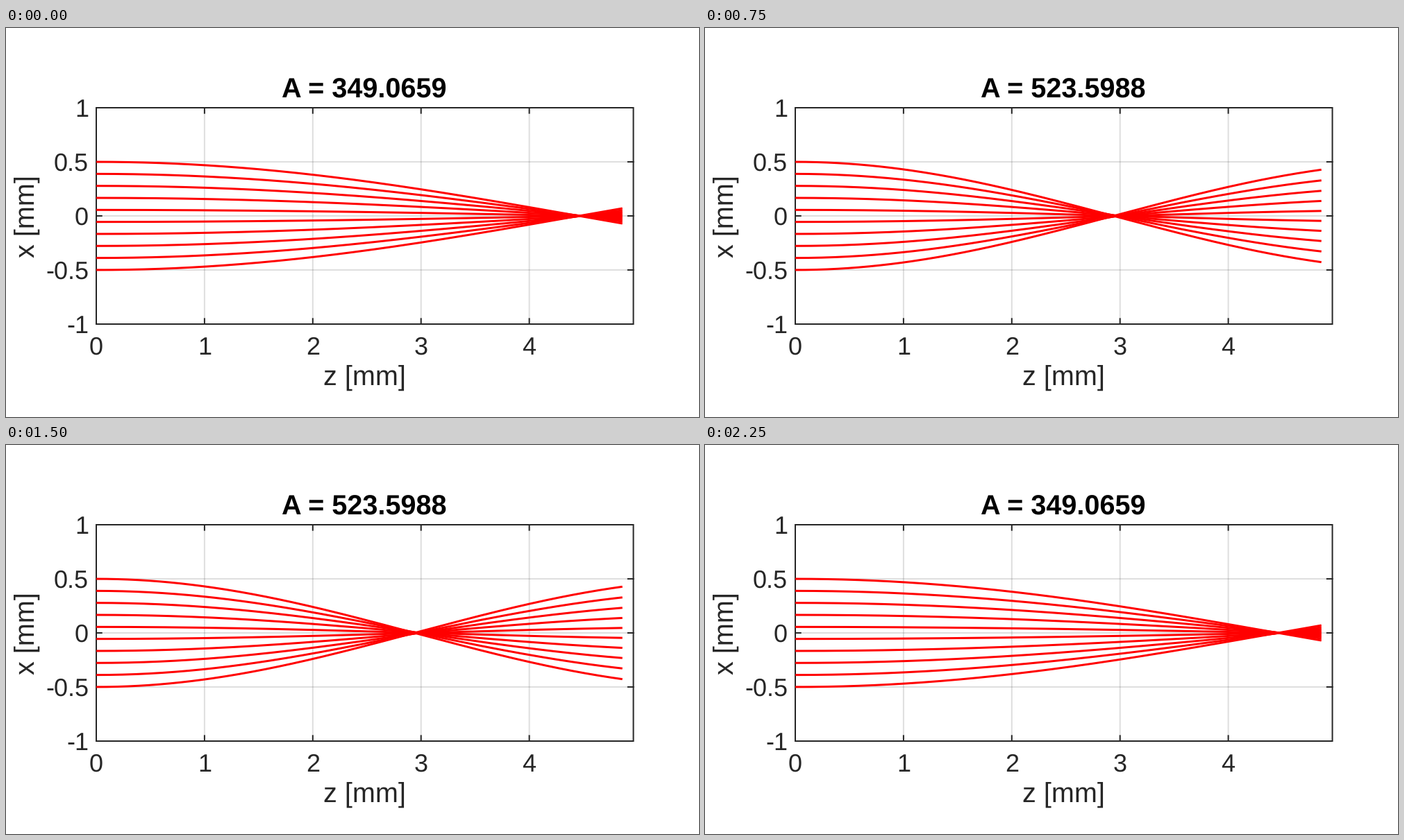
Animation, 998 px wide and 561 px high, one loop 2.5 s. Source, as a matplotlib script:

```python
import numpy as np
import matplotlib.pyplot as plt
from matplotlib.animation import FuncAnimation

W, H, DPI = 998, 561, 64
PX = 72 / DPI                       # points per pixel
LEFT, RIGHT, TOP, BOTTOM = 130, 903.5, 115, 427
UNIT, MID = 155.9, 271              # pixels per mm, row of x = 0
TICK, INK = 7.7, "#262626"
TICK_SIZE, LABEL_SIZE = 36, 39.6

plt.rcParams.update({"font.family": "Liberation Sans", "text.hinting": "none",
                     "path.snap": False})
fig = plt.figure(figsize=(W / DPI, H / DPI), dpi=DPI, facecolor="white")
ax = fig.add_axes([0, 0, 1, 1])
ax.set(xlim=(0, W), ylim=(H, 0))
ax.axis("off")


def px(z):
    return LEFT + UNIT * z


def py(x):
    return MID - UNIT * x


def line(xs, ys, color=INK, width=2, **style):
    return ax.plot(xs, ys, color=color, lw=width * PX, snap=False, **style)[0]


def text(x, y, label, size, **style):
    style = {"color": INK, **style}
    return ax.text(x, y, label, fontsize=size * PX, ha="left", va="baseline",
                   rotation_mode="anchor", **style)


# Grid, ticks and tick labels
for z in range(5):
    x = px(z)
    if z:
        line([x, x], [TOP, BOTTOM], alpha=0.15, solid_capstyle="butt")
        line([x, x], [TOP, TOP + TICK])
        line([x, x], [BOTTOM, BOTTOM - TICK])
    text(x - 10, 471, str(z), TICK_SIZE)

for value, start in ((1, 99), (0.5, 69), (0, 99), (-0.5, 57), (-1, 87)):
    y = py(value)
    if abs(value) < 1:
        line([LEFT, RIGHT], [y, y], alpha=0.15, solid_capstyle="butt")
        line([LEFT, LEFT + TICK], [y, y])
        line([RIGHT, RIGHT - TICK], [y, y])
    text(start, y + 13, f"{value:g}", TICK_SIZE)

line([LEFT, RIGHT, RIGHT, LEFT, LEFT], [TOP, TOP, BOTTOM, BOTTOM, TOP],
     solid_joinstyle="miter", solid_capstyle="projecting")
text(457, 516, "z [mm]", LABEL_SIZE)
text(42, 330.5, "x [mm]", LABEL_SIZE, rotation=90)
title = text(397, 101, "", LABEL_SIZE, color="black", weight="bold")

# Parallel rays entering a graded-index medium
depth = np.linspace(0, 4.86, 200)
heights = np.linspace(-0.5, 0.5, 10)
rays = [line([], [], "red", 3, solid_capstyle="butt", zorder=3) for _ in heights]
divisors = [9, 8, 7, 6, 5, 5, 6, 7, 8, 9]


def update(frame):
    gradient = np.pi / divisors[frame]
    for ray, x0 in zip(rays, heights):
        # Outer rays oscillate slightly faster than paraxial ones
        rate = gradient * (1 + 0.3 * (gradient * x0) ** 2)
        ray.set_data(px(depth), py(x0 * np.cos(rate * depth)))
    label = f"A = {1000 * gradient:.7g}"
    title.set_text(label)
    title.set_x(397 + 11 * (12 - len(label)))
    return [*rays, title]


anim = FuncAnimation(fig, update, frames=len(divisors), interval=250,
                     repeat=True, repeat_delay=0)
plt.show()
```
